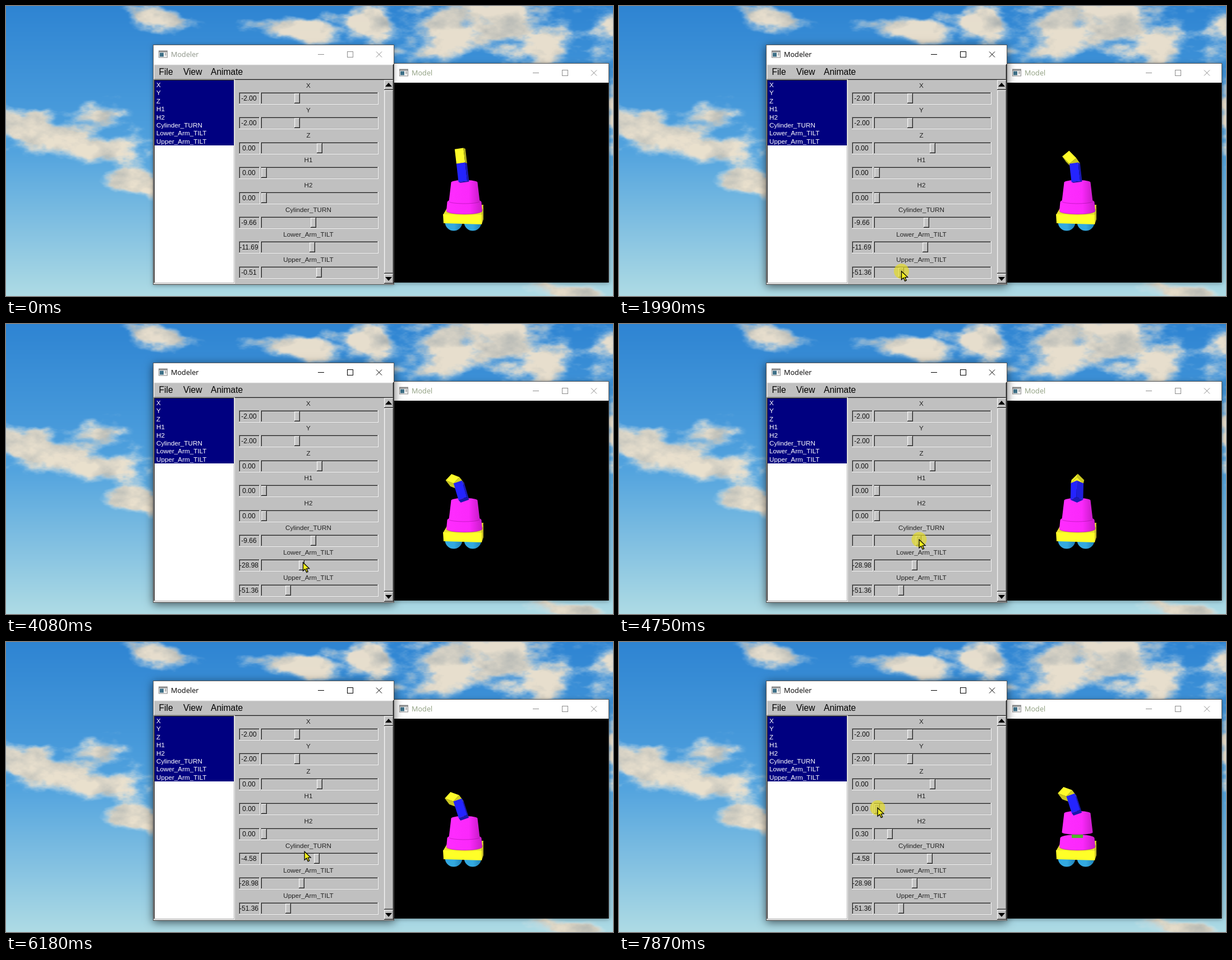
Animation of 1082 by 518 pixels, one loop 8 s. Source, as an HTML page with a canvas:

```html
<!DOCTYPE html>
<html lang="en">
<head>
<meta charset="utf-8">
<title>Modeler</title>
<style>
html, body { margin: 0; width: 100%; height: 100%; overflow: hidden; }
canvas { display: block; }
</style>
</head>
<body>
<canvas id="stage" width="1082" height="518"></canvas>
<script>
const W = 1082, H = 518, LOOP = 8000;
const c = document.getElementById('stage').getContext('2d');
const clamp = (v, lo = 0, hi = 1) => Math.max(lo, Math.min(hi, v));
const lerp = (a, b, k) => a + (b - a) * k;
const mix = (a, b, k) => a.map((v, i) => lerp(v, b[i], k));
const smooth = k => k * k * (3 - 2 * k);
const easeOut = k => 1 - (1 - k) ** 3;
const progress = (t, from, to) => clamp((t - from) / (to - from));

// ---------- drawing helpers ----------
function rect(x, y, w, h, fill) {
  c.fillStyle = fill;
  c.fillRect(x, y, w, h);
}
function poly(points, fill) {
  c.beginPath();
  points.forEach(p => c.lineTo(p[0], p[1]));
  c.closePath();
  c.fillStyle = fill;
  c.fill();
}
function circle(x, y, r, fill) {
  c.beginPath();
  c.arc(x, y, r, 0, 7);
  c.fillStyle = fill;
  c.fill();
}
function line(color, ...points) {
  c.beginPath();
  points.forEach(p => c.lineTo(p[0], p[1]));
  c.strokeStyle = color;
  c.lineWidth = 1;
  c.stroke();
}
function text(s, x, y, size, color, align = 'left', font = '"Liberation Sans", Arial, sans-serif') {
  c.font = size + 'px ' + font;
  c.textAlign = align;
  c.fillStyle = color;
  c.fillText(s, x, y);
}
function edge(x, y, w, h, topLeft, bottomRight) {
  rect(x, y, w, 1, topLeft);
  rect(x, y, 1, h, topLeft);
  rect(x, y + h - 1, w, 1, bottomRight);
  rect(x + w - 1, y, 1, h, bottomRight);
}
function sunken(x, y, w, h) {
  edge(x, y, w, h, '#929292', '#f4f4f4');
  edge(x + 1, y + 1, w - 2, h - 2, '#1c1c1c', '#b4b4b4');
}
function raised(x, y, w, h) {
  edge(x, y, w, h, '#f4f4f4', '#1c1c1c');
  edge(x + 1, y + 1, w - 2, h - 2, '#d0d0d0', '#8c8c8c');
}

// ---------- sky: fractal noise shaped by a few soft ellipses ----------
function hash(x, y) {
  const s = Math.sin(x * 127.1 + y * 311.7) * 43758.5453;
  return s - Math.floor(s);
}
function noise(x, y) {
  const ix = Math.floor(x), iy = Math.floor(y), u = smooth(x - ix), v = smooth(y - iy);
  return lerp(lerp(hash(ix, iy), hash(ix + 1, iy), u), lerp(hash(ix, iy + 1), hash(ix + 1, iy + 1), u), v);
}
function fractal(x, y) {
  let sum = 0;
  for (let o = 0, a = .5; o < 5; o++, a /= 2) sum += a * noise(x * 2 ** o + o * 17, y * 2 ** o);
  return sum;
}
const clouds = [ // x, y, rx, ry, slope
  [168, 196, 62, 34, -.1], [25, 226, 85, 42, .1], [125, 245, 130, 32, .2], [225, 302, 80, 32, .45],
  [275, 22, 55, 22, .1], [555, 48, 95, 24, .15], [640, 25, 90, 32, .3],
  [890, 45, 260, 68, .08], [1085, 200, 20, 90, 0], [1010, 512, 80, 16, .1]
];
function cover(x, y) {
  return Math.max(...clouds.map(([cx, cy, rx, ry, slope]) => {
    const dx = x - cx, dy = y - cy - slope * dx;
    return 1 - Math.hypot(dx / rx, dy / ry);
  }));
}
function paintSky() {
  const canvas = document.createElement('canvas');
  canvas.width = W;
  canvas.height = H;
  const ctx = canvas.getContext('2d'), image = ctx.createImageData(W, H);
  for (let y = 0; y < H; y++) {
    const k = y / H;
    const blue = k < .5 ? mix([46, 132, 210], [82, 163, 222], k * 2) : mix([82, 163, 222], [174, 219, 228], k * 2 - 1);
    for (let x = 0; x < W; x++) {
      const d = cover(x, y);
      let rgb = blue;
      if (d > -.8) {
        const n = fractal(x / 60, y / 32);
        const alpha = smooth(clamp((d * 1.1 + (n - .47) * 2.2) / .75));
        const tint = fractal(x / 45 + 40, y / 30 + 9);
        const body = mix([222, 234, 240], mix([178, 178, 172], [246, 229, 204], clamp(tint * 2 - .1)), alpha);
        rgb = mix(blue, body, alpha * .92);
      }
      image.data.set([...rgb, 255], (y * W + x) * 4);
    }
  }
  ctx.putImageData(image, 0, 0);
  return canvas;
}
const sky = paintSky();

// ---------- sliders and gestures ----------
const names = ['X', 'Y', 'Z', 'H1', 'H2', 'Cylinder_TURN', 'Lower_Arm_TILT', 'Upper_Arm_TILT'];
const initial = [-2, -2, 0, 0, 0, -9.66, -11.69, -.51];
const rowY = row => 142 + row * 44.4;
function handleX(row, value) {
  if (row < 3) return 558.5 + 20 * value;
  return row < 5 ? 460 + 77 * value : 558.5 + 1.09 * value;
}

// moves: start time, end time, value reached
const gestures = [
  { row: 7, press: 1310, release: 2320, moves: [[1380, 1990, -51.36]] },
  { row: 6, press: 2870, release: 4010, moves: [[3139, 3140, -12.71], [3290, 3550, -28.98]] },
  { row: 5, press: 4430, release: 5990, moves: [[4470, 4750, -22.5], [4840, 5430, -24.6], [5430, 5640, -4.58]] },
  { row: 4, press: 6660, release: 7390, moves: [[6700, 7300, .3]] },
  { row: 3, press: 7870, release: LOOP, moves: [] }
];
function valueAt(row, t) {
  const gesture = gestures.find(g => g.row === row);
  let value = initial[row];
  if (gesture) for (const [from, to, goal] of gesture.moves) value = lerp(value, goal, easeOut(progress(t, from, to)));
  return value;
}
function grip(row, t) {
  return [handleX(row, valueAt(row, t)) + 1, rowY(row) + 21];
}
function cursorAt(t) {
  const i = gestures.findIndex(g => t < g.release), next = gestures[i], last = gestures[i - 1];
  if (t >= next.press) return grip(next.row, t);
  const left = last ? last.release : 200;
  const k = smooth(progress(t, left, Math.min(next.press, left + 600)));
  const p = mix(last ? grip(last.row, t) : [614, 480], grip(next.row, t), k);
  if (!last) p[1] -= 35 * Math.sin(Math.PI * k);
  return p;
}

// ---------- windows ----------
function frameWindow(x, y, w, h, title, active, ink) {
  c.save();
  c.shadowColor = `rgba(0,0,0,${active ? .6 : .35})`;
  c.shadowBlur = active ? 15 : 8;
  c.shadowOffsetY = active ? 3 : 1;
  rect(x, y, w, h, '#555');
  c.restore();
  rect(x + 1, y + 1, w - 2, 34, '#fff');
  const mid = y + 17.5, r = x + w, gray = active ? '#000' : '#8c8c8c';
  rect(x + 10, mid - 7, 16, 13, '#888');
  rect(x + 11, mid - 4, 14, 9, '#f4f4f4');
  rect(x + 12, mid - 3, 7, 7, '#3d6f86');
  rect(x + 21, mid - 3, 3, 5, '#bbb');
  text(title, x + 32, mid + 4.5, 12.7, ink, 'left', '"Open Sans", sans-serif');
  line(gray, [r - 136, mid], [r - 125, mid]);
  c.strokeRect(r - 83.5, mid - 5, 10, 10);
  line(gray, [r - 32, mid - 5], [r - 22, mid + 5]);
  line(gray, [r - 32, mid + 5], [r - 22, mid - 5]);
}

function slider(row, t, pressed) {
  const top = Math.round(rowY(row) + 12), value = valueAt(row, t), x = handleX(row, value);
  const start = handleX(row, initial[row]);
  const moves = pressed ? gestures.find(g => g.row === row).moves : [];
  const dragging = moves.length && t < moves[moves.length - 1][1] && Math.abs(x - start) > 2;
  text(names[row], 539, rowY(row) + 4, 11.7, '#222', 'center');
  sunken(415, top, 38, 22);
  if (!dragging) text(value.toFixed(2), 433, top + 14.5, 12, '#111', 'center');
  sunken(454, top, 210, 22);
  const left = Math.round(x - 5);
  rect(left, top + 2, 10, 18, '#c4c4c4');
  raised(left, top + 2, 10, 18);
  if (pressed) {
    c.setLineDash([1, 1]);
    c.strokeStyle = '#222';
    c.strokeRect(left + 2.5, top + 4.5, 4, 13);
    c.setLineDash([]);
  }
}

function modelerWindow(t, held) {
  const active = t >= gestures[0].press;
  frameWindow(262, 69, 430, 429, 'Modeler', active, active ? '#000' : '#8d9488');
  rect(263, 104, 428, 393, '#c0c0c0');
  raised(263, 104, 428, 28);
  text('File', 272.5, 123, 15.6, '#000');
  text('View', 316, 123, 15.6, '#000');
  text('Animate', 365, 123, 15.6, '#000');
  rect(263, 131, 145, 365, '#fff');
  sunken(263, 131, 145, 365);
  rect(265, 133, 141, 116, '#000080');
  names.forEach((name, row) => {
    text(name, 268, 145 + row * 14.4, 11.7, '#fff');
    slider(row, t, held && held.row === row);
  });
  raised(674, 132, 17, 18);
  raised(674, 150, 17, 328);
  raised(674, 478, 17, 18);
  poly([[676, 144], [682, 137], [688, 144]], '#000');
  poly([[676, 484], [682, 491], [688, 484]], '#000');
}

// ---------- robot ----------
const PITCH = .05, VIEW = [0, Math.sin(PITCH), Math.cos(PITCH)], LIGHT = [-.4, .5, .77];
const dot = (a, b) => a[0] * b[0] + a[1] * b[1] + a[2] * b[2];
const sum = (a, k, b, m) => a.map((v, i) => v * k + b[i] * m);
const project = p => [816 + p[0], 314 - p[1] * VIEW[2] + p[2] * VIEW[1]];

function arm(base, heading, tilt, length) {
  const away = [-Math.sin(heading), 0, -Math.cos(heading)], up = [0, 1, 0];
  const side = [Math.cos(heading), 0, -Math.sin(heading)];
  const axis = sum(away, Math.sin(tilt), up, Math.cos(tilt));
  const across = sum(away, Math.cos(tilt), up, -Math.sin(tilt));
  return { base, axis, side, across, tip: sum(base, 1, axis, length) };
}

function drawArm({ base, tip, axis, side, across }, rgb) {
  const R = 11.3;
  const ring = [0, 1, 2, 3].map(i => {
    const a = i * Math.PI / 2;
    return sum(side, R * Math.cos(a), across, R * Math.sin(a));
  });
  const at = (p, q) => sum(p, 1, q, 1);
  const face = (normal, points) => {
    if (dot(normal, VIEW) <= 0) return;
    const shade = Math.min(1, .74 + .3 * dot(normal, LIGHT));
    poly(points.map(project), `rgb(${rgb.map(v => v * shade)})`);
  };
  face(axis.map(v => -v), ring.map(q => at(base, q)));
  ring.forEach((q, i) => {
    const n = ring[(i + 1) % 4], k = Math.SQRT1_2 / R;
    face(sum(q, k, n, k), [at(base, q), at(base, n), at(tip, n), at(tip, q)]);
  });
  face(axis, ring.map(q => at(tip, q)));
}

function drum(y1, rx1, y2, rx2, ry) {
  const g = c.createLinearGradient(817 - rx2, 0, 817 + rx2, 0);
  g.addColorStop(0, '#ff2cff');
  g.addColorStop(.65, '#fb28fb');
  g.addColorStop(1, '#c81cc8');
  c.beginPath();
  c.ellipse(817, y1, rx1, ry, 0, Math.PI, 0);
  c.ellipse(817, y2, rx2, ry, 0, 0, Math.PI);
  c.closePath();
  c.fillStyle = g;
  c.fill();
  c.beginPath();
  c.ellipse(817, y2, rx2, ry, 0, .1, Math.PI - .1);
  c.strokeStyle = 'rgba(150,10,150,.5)';
  c.lineWidth = 1;
  c.stroke();
}

function modelWindow(t) {
  const [height, turn, lowerTilt, upperTilt] = [4, 5, 6, 7].map(row => valueAt(row, t));
  frameWindow(691, 102, 384, 392, 'Model', false, '#8f9f80');
  rect(692, 137, 382, 357, '#000');
  for (const x of [798, 832]) {
    const g = c.createLinearGradient(x - 15, 0, x + 16, 0);
    g.addColorStop(.5, '#33a9e0');
    g.addColorStop(1, '#1f7fb4');
    circle(x, 386, 15.5, g);
  }
  poly([[779, 373], [786, 361], [851, 355], [848, 374]], '#e8e030');
  poly([[848, 373], [851, 355], [851, 381], [848, 390]], '#c9bd26');
  poly([[779, 372], [848, 373], [848, 390], [780, 388]], '#ffff28');

  const lift = height * 30;
  drum(350, 30.5, 366, 32, 6);
  if (lift > 1) rect(807, 343, 20, 7, '#4fb52c');
  drum(315 - lift, 23.5, 349 - lift, 27.5, 4);

  // the arm swings faster the further the cylinder is turned
  const rad = Math.PI / 180, heading = (36 - .12 * (turn + 4.58) ** 2) * rad;
  const lower = arm([0, lift, 0], heading, -lowerTilt * rad, 33);
  const upper = arm(lower.tip, heading, -(lowerTilt + upperTilt) * rad, 26.5);
  drawArm(upper, [255, 252, 42]);
  drawArm(lower, [36, 36, 255]);
}

function cursor([x, y], pressed) {
  if (pressed) circle(x, y, 13.5, 'rgba(228,220,40,.7)');
  const arrow = [[0, 0], [0, 15], [3.6, 11.8], [6.2, 17.5], [8.7, 16.4], [6.2, 10.8], [11, 10.6]];
  poly(arrow.map(p => [x + p[0], y + p[1]]), '#f4f01c');
  c.lineWidth = 1.3;
  c.strokeStyle = '#000';
  c.stroke();
}

// ---------- main loop ----------
function draw(t) {
  const held = gestures.find(g => t >= g.press && t < g.release);
  c.drawImage(sky, 0, 0);
  modelWindow(t);
  modelerWindow(t, held);
  if (t >= 200) cursor(cursorAt(t), held);
}

const start = performance.now();
function tick() {
  draw((performance.now() - start) % LOOP);
  requestAnimationFrame(tick);
}
tick();
</script>
</body>
</html>
```
